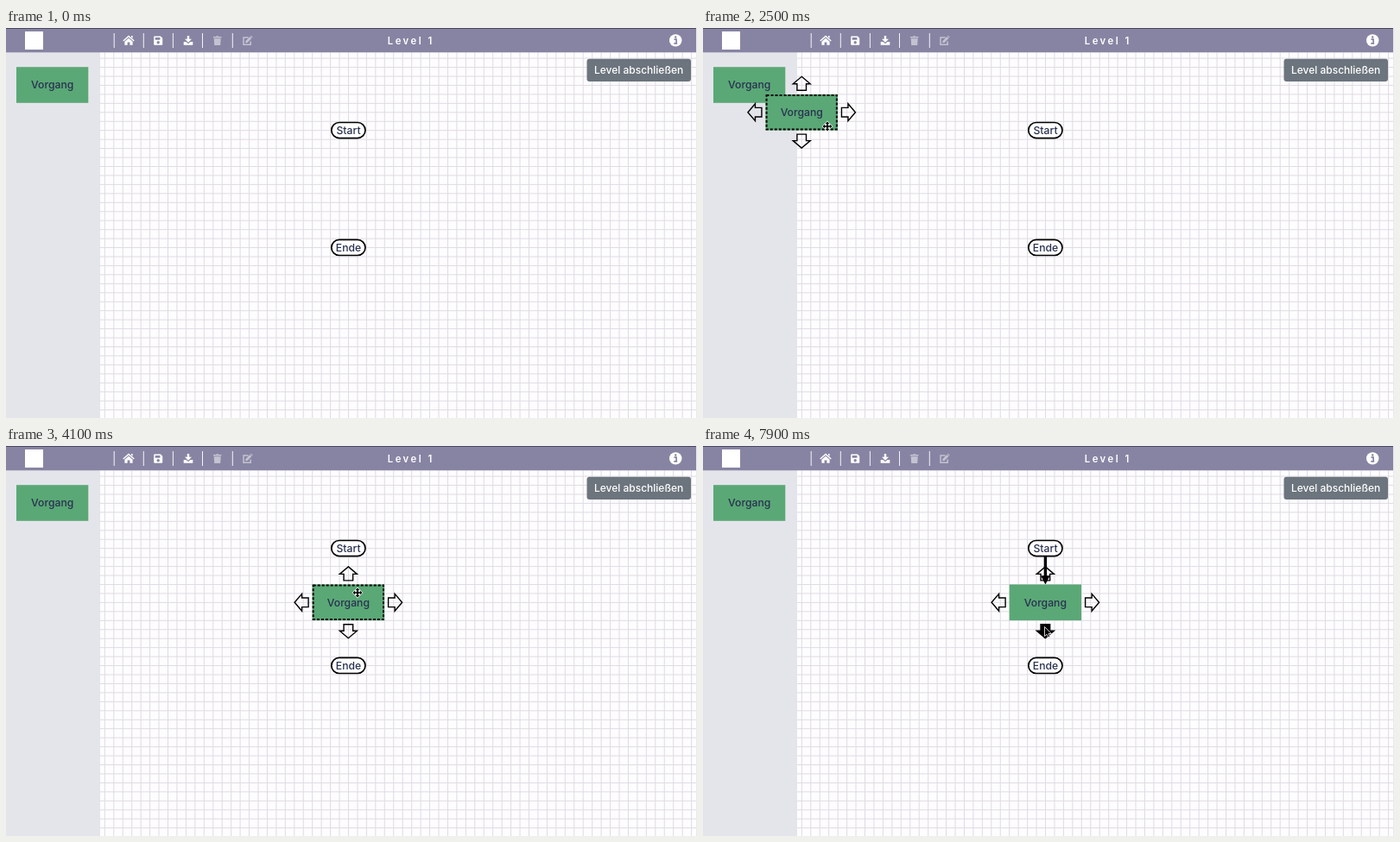
Animation, 800 px wide and 452 px high, one loop 8 s. Source, as an HTML page:

```html
<!DOCTYPE html>
<html lang="de">
<head>
<meta charset="utf-8">
<title>Level 1</title>
<style>
  html, body { margin: 0; width: 100%; height: 100%; overflow: hidden; background: #fdfcfe; }
  svg { display: block; width: 800px; height: 452px; }
  text { font: 500 12.2px Inter, sans-serif; fill: #293150; text-anchor: middle; }
  .title { font-size: 11.3px; font-weight: 600; letter-spacing: 2.5px; fill: #fff; }
  .button { font-size: 12px; fill: #fff; }
  .pill { fill: #fff; stroke: #000; stroke-width: 1.7; }
  .arrow { fill: transparent; stroke: #000; stroke-width: 1.4; }
  .arrow.hot { fill: #000; }
  .dash { fill: none; stroke-width: 2; stroke-dasharray: 3 2; }
  .off { opacity: .5; }
</style>
</head>
<body>
<svg viewBox="0 0 800 452">
  <defs>
    <g id="task">
      <rect width="83.3" height="41.6" fill="#5aa876"/>
      <text x="41.7" y="25.3">Vorgang</text>
    </g>
    <path id="tip" class="arrow" d="M0-16L10-7.5H5.3V0H-5.3V-7.5H-10Z"/>
  </defs>

  <path id="grid" stroke="#dfdce2" fill="none"/>
  <rect y="28" width="109" height="424" fill="#e4e5ea"/>
  <rect width="800" height="28.3" fill="#8784a3"/>
  <rect width="800" height="1" fill="#4b4960"/>
  <rect x="799" width="1" height="452" fill="#ebe9ef"/>
  <rect x="22" y="4" width="21" height="21" fill="#fff"/>
  <path d="M125.2 6V23M159.3 6V23M193.4 6V23M227.5 6V23M262.3 6V23" stroke="#f4f3f7"/>

  <g fill="#fff">
    <path d="M142 8.6L148.7 14.6L147.8 15.6L142 10.5L136.2 15.6L135.3 14.6ZM142 11.7L146.6 15.7V19.7H143.4V16.5H140.6V19.7H137.4V15.7ZM145 9H146.6V12L145 10.6Z"/>
    <path fill-rule="evenodd" d="M172 9.5H179L181.2 11.7V19Q181.2 19.8 180.4 19.8H172Q171.2 19.8 171.2 19V10.3Q171.2 9.5 172 9.5ZM172.7 11V13.7H178.4V11ZM176.2 15A1.7 1.7 0 1 0 176.2 18.4A1.7 1.7 0 1 0 176.2 15Z"/>
    <path d="M209.8 9H212.2V12.7H215L211 16.8L207 12.7H209.8ZM205.7 16H208.5L211 18.2L213.5 16H216.3V19.8H205.7Z"/>
    <path class="off" d="M240 10H243L243.6 9.2H245.8L246.4 10H249.4V11.4H240ZM240.7 12.2H248.7L248.2 19.9H241.2Z"/>
    <g class="off">
      <path d="M280.5 10.9H275V19.3H283.2V15.5" fill="none" stroke="#fff" stroke-width="1.5"/>
      <path d="M277.5 15L282.4 10.1L284.4 12.1L279.5 17L277.2 17.3ZM283 9.5L283.8 8.8L285.7 10.7L285 11.5Z"/>
    </g>
    <circle cx="775.2" cy="14.4" r="7.2"/>
  </g>
  <path d="M773.5 13.1H776.1V17.5M773.3 17.9H777.2" stroke="#8784a3" stroke-width="1.7" fill="none"/>
  <circle cx="775.2" cy="10.5" r="1.2" fill="#8784a3"/>
  <text class="title" x="468.8" y="18.6">Level 1</text>
  <rect x="672.5" y="35.7" width="120.5" height="26.3" rx="3" fill="#6c747d"/>
  <text class="button" x="732.6" y="53.2">Level abschließen</text>

  <use href="#task" x="12" y="45.2"/>
  <path id="link" fill="none" stroke="#000" stroke-width="3.4"/>
  <path id="head" d="M391.1 150.3H401.7L396.4 160.5Z"/>
  <rect class="pill" x="376.8" y="109.5" width="39.2" height="18.1" rx="9"/>
  <text x="396.5" y="122.9">Start</text>
  <rect class="pill" x="376.8" y="245.4" width="39.2" height="18.1" rx="9"/>
  <text x="396.5" y="258.8">Ende</text>
  <g id="node">
    <use href="#task"/>
    <rect id="dash" class="dash" x="1" y="1" width="81.3" height="39.6"/>
  </g>
  <g id="arrows"></g>
  <path id="pointer" d="M0 0V11L2.6 8.7L4.4 12.4L6.2 11.6L4.5 8H7.8Z" fill="#000" stroke="#fff" stroke-width=".8"/>
  <path id="mover" d="M0-5.5L2.3-3H.8V-.8H3V-2.3L5.5 0L3 2.3V.8H.8V3H2.3L0 5.5L-2.3 3H-.8V.8H-3V2.3L-5.5 0L-3-2.3V-.8H-.8V-3H-2.3Z" fill="#000" stroke="#fff" stroke-width="1.2" paint-order="stroke"/>
</svg>
<script>
const $ = id => document.getElementById(id);
const LOOP = 8000, STEP = 100;
const CELL = 10.45, LEFT = -.6, TOP = 35.1;
const W = 83.3, H = 41.6, GAP = 4.6;
const START = { x: 396.4, y: 118.6, w: 20, h: 9.6 };

let lines = '';
for (let x = LEFT + CELL * 11; x < 799; x += CELL) lines += `M${x} 28.3V452`;
for (let y = TOP; y < 452; y += CELL) lines += `M109 ${y}H799`;
$('grid').setAttribute('d', lines);

// Up, right, down, left
const tips = [0, 1, 2, 3].map(() => {
  const tip = $('tip').cloneNode();
  tip.removeAttribute('id');
  return $('arrows').appendChild(tip);
});

// Cursor path: time, x, y
const path = [
  [600, 290, 452], [900, 248, 345], [1200, 195, 213], [1700, 62, 78],
  [2000, 60, 72], [2500, 144, 114], [2700, 126, 98], [3300, 377, 181.5],
  [3600, 408, 182], [4000, 408, 182], [4500, 403, 122], [5100, 399, 113],
  [5400, 397, 141], [6200, 397, 141], [6700, 397.7, 175.5], [7100, 398, 176],
  [7500, 397, 192], [7900, 395.5, 209.5]
];

function cursorAt(t) {
  const i = path.findIndex(p => p[0] >= t);
  if (i < 1) return i ? path.at(-1).slice(1) : path[0].slice(1);
  const [t0, x0, y0] = path[i - 1], [t1, x1, y1] = path[i];
  const k = (t - t0) / (t1 - t0);
  return [x0 + (x1 - x0) * k, y0 + (y1 - y0) * k];
}

const between = (t, a, b) => t >= a && t < b;
const snap = (v, origin) => origin + Math.round((v - origin) / CELL) * CELL;
const inside = (n, x, y) => Math.abs(x - n.x) < n.w && Math.abs(y - n.y) < n.h;
const show = (el, on) => el.setAttribute('visibility', on ? 'visible' : 'hidden');
const place = (el, x, y, turn = 0) =>
  el.setAttribute('transform', `translate(${x} ${y}) rotate(${turn})`);

function boxAt(t) {
  const [cx, cy] = cursorAt(Math.min(Math.max(t, 2700), 3600));
  const x = snap(cx - 12 - W / 2, LEFT), y = snap(cy - H / 2, TOP);
  return { x: x + W / 2, y: y + H / 2, w: W / 2, h: H / 2 };
}

function draw(t) {
  const [x, y] = cursorAt(t), box = boxAt(t);
  const linking = between(t, 6300, 6900), linked = t >= 6900;
  const owner = between(t, 2200, 4300) || linked ? box
    : between(t, 4500, 6300) ? START : null;
  const hot = between(t, 5300, 6300) || t >= 7700;
  const onBox = t >= 2000 && inside(box, x, y);

  show($('node'), t >= 2000);
  place($('node'), box.x - box.w, box.y - box.h);
  $('dash').setAttribute('stroke', linking ? '#1b2160' : '#000');
  $('dash').setAttribute('opacity', onBox ? 1 : 0);

  show($('arrows'), owner);
  if (owner) tips.forEach((tip, i) => {
    const dx = [0, 1, 0, -1][i], dy = [-1, 0, 1, 0][i];
    place(tip, owner.x + dx * (owner.w + GAP), owner.y + dy * (owner.h + GAP), i * 90);
    tip.classList.toggle('hot', hot && i === 2);
  });

  const end = linked ? 154 : Math.min(y, 161), mid = (128 + end) / 2 - 5;
  const toX = linked ? START.x : x + .8;
  show($('link'), linking || linked);
  show($('head'), linked);
  $('link').setAttribute('d', `M${START.x} 128V${mid}H${toX}V${end}`);

  const moving = onBox || (t > 4300 && inside(START, x, y));
  show($('pointer'), t > 600 && !moving);
  show($('mover'), moving);
  place($('pointer'), x, y);
  place($('mover'), x, y);
}

const begin = performance.now();
function tick() {
  const t = (performance.now() - begin) % LOOP;
  draw(Math.floor(t / STEP) * STEP);
  requestAnimationFrame(tick);
}
tick();
</script>
</body>
</html>
```
